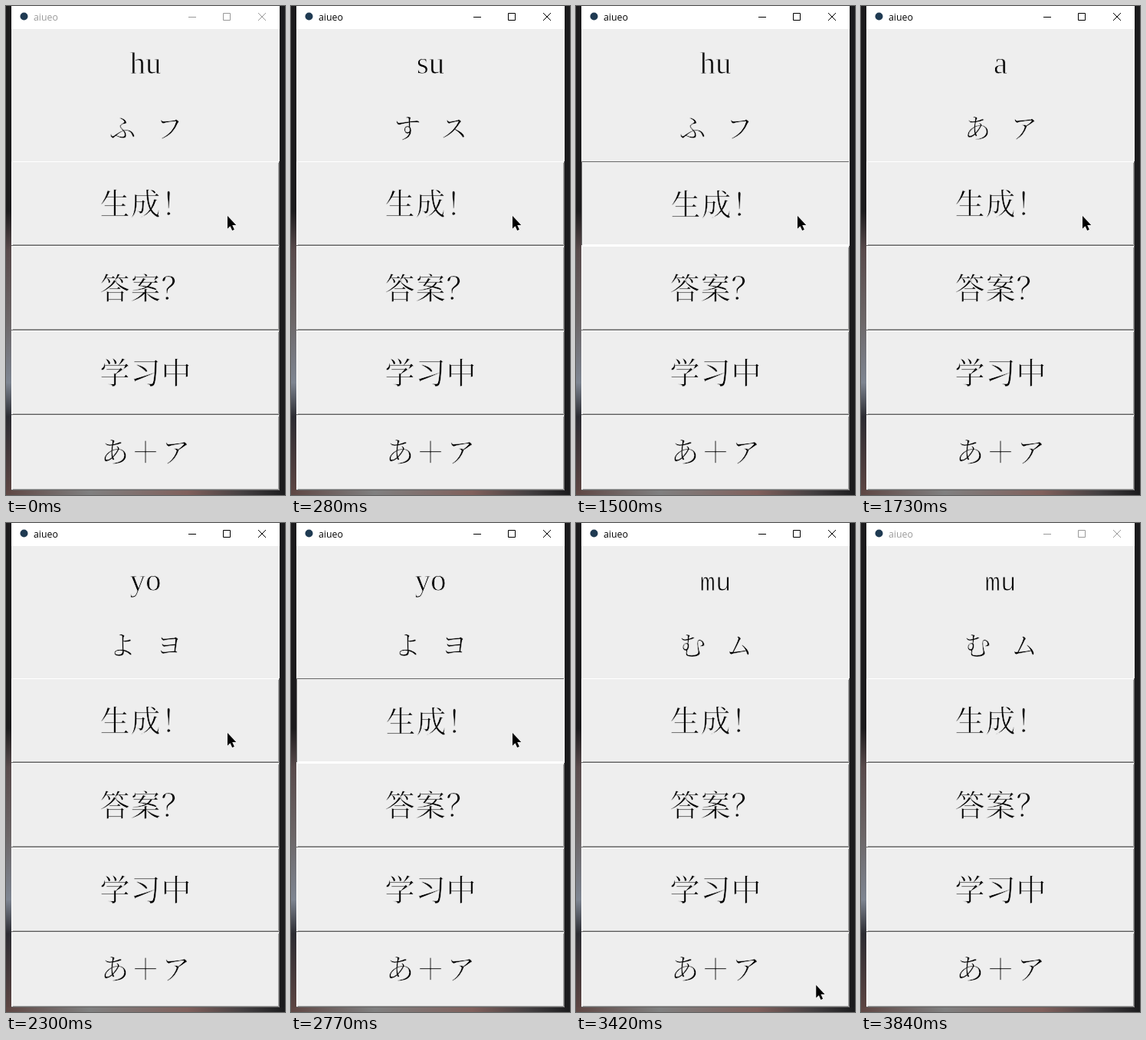
Recreate the animation shown at these times as an HTML page. Size 364 by 636 pixels, loop 3.88 s.

```html
<!DOCTYPE html>
<html lang="zh-CN">
<head>
<meta charset="utf-8">
<style>
html, body { margin: 0; height: 100%; overflow: hidden; background: #1b1b1d; }
svg { display: block; }
text { text-anchor: middle; }
.cjk { font: 300 39px "Noto Serif CJK SC", "Noto Sans CJK SC", "Noto Sans CJK", serif; }
.cjk, #romaji { stroke: #eee; stroke-width: .6px; }
.kana { font-size: 37px; }
#kana { font-size: 35px; }
.title { font: 12.3px "Open Sans", sans-serif; text-anchor: start; }
#romaji { font: 41px "Liberation Serif", serif; stroke-width: .9px; }
#romaji.mono { font: 34px "Liberation Mono", monospace; }
.light, .dark, .shade { fill: none; stroke: #fff; }
.dark { stroke: #696969; }
.shade { stroke: #a0a0a0; }
.pressed .light { stroke: #696969; }
.pressed .dark, .pressed .shade { stroke: #fff; }
.pressed text { transform: translate(1px, 1px); }
</style>
</head>
<body>
<svg id="stage" width="364" height="636" viewBox="0 0 364 636">
  <defs>
    <linearGradient id="left" x2="0" y2="1">
      <stop offset="0" stop-color="#1c1b1d"/>
      <stop offset=".42" stop-color="#1c1b1d"/>
      <stop offset=".5" stop-color="#594b4c"/>
      <stop offset=".64" stop-color="#6c6667"/>
      <stop offset=".77" stop-color="#7e8591"/>
      <stop offset=".84" stop-color="#2c2c32"/>
      <stop offset="1" stop-color="#5f4744"/>
    </linearGradient>
    <linearGradient id="bottom">
      <stop offset="0" stop-color="#5f4744"/>
      <stop offset=".3" stop-color="#808080"/>
      <stop offset=".65" stop-color="#80605c"/>
      <stop offset=".85" stop-color="#444042"/>
      <stop offset="1" stop-color="#1b1b1d"/>
    </linearGradient>
  </defs>
  <rect width="364" height="636" fill="#1b1b1d"/>
  <rect width="7" height="636" fill="url(#left)"/>
  <rect y="630" width="364" height="6" fill="url(#bottom)"/>
  <rect x="7" width="350" height="630" fill="#eee"/>
  <rect x="7" width="350" height="30" fill="#fff"/>
  <circle cx="23.5" cy="13.5" r="5" fill="#1f3a52"/>
  <g id="caption">
    <text class="title" x="36" y="19">aiueo</text>
    <path fill="none" stroke="currentColor" d="M238 14.5h10M283.5 9.5h9v9h-9zM329 9l10 10M339 9l-10 10"/>
  </g>
  <text id="romaji" x="182" y="88"></text>
  <text id="kana" class="cjk" x="152 213" y="172"></text>
  <g id="buttons"></g>
  <path id="cursor" d="M0 0V16.5L3.6 13.2L6.2 19L8.8 17.8L6.2 12H11.2Z"/>
</svg>
<script>
const LOOP = 3880, STEP = 46.85, HOLD = 135;
const $ = id => document.getElementById(id);
const buttons = [['生成！', 202, 312], ['答案？', 312, 422], ['学习中', 422, 532], ['あ＋ア', 532, 630]];
const clicks = [[50, 'su', 'すス'], [700, 'hu', 'ふフ'], [1500, 'a', 'あア'], [2110, 'yo', 'よヨ'], [2720, 'mu', 'むム']];
const path = [[0, 289, 273], [2900, 289, 273], [3000, 292, 300], [3140, 304, 440], [3235, 304, 529], [3515, 318, 638], [LOOP, 318, 660]];

$('buttons').innerHTML = buttons.map(([label, top, bottom], i) => `<g>
  <path class="shade" d="M9 ${bottom - 1.5}H355.5V${top + 2}"/>
  <path class="dark" d="M7 ${bottom - .5}H356.5V${top}"/>
  <path class="light" d="M7.5 ${bottom - 1}V${top + .5}H356"/>
  <text class="cjk ${i === 3 ? 'kana' : ''}" x="142 182 222" y="${(top + bottom) / 2 + (i === 3 ? 13 : 14)}">${label}</text>
</g>`).join('');
const generate = $('buttons').firstElementChild;

function cursorAt(t) {
  const i = path.findIndex(p => p[0] > t);
  const [t0, x0, y0] = path[i - 1], [t1, x1, y1] = path[i];
  const k = (t - t0) / (t1 - t0);
  return [x0 + (x1 - x0) * k, y0 + (y1 - y0) * k];
}

function draw() {
  const t = performance.now() % LOOP;
  const color = t >= 50 && t < 3840 ? '#000' : '#999';
  $('caption').style.color = $('caption').style.fill = color;

  let romaji = 'hu', kana = 'ふフ', pressed = false;
  for (const [start, nextRomaji, nextKana] of clicks) {
    if (t >= start + HOLD) [romaji, kana] = [nextRomaji, nextKana];
    else if (t >= start) pressed = true;
  }
  $('romaji').textContent = romaji;
  $('romaji').setAttribute('class', romaji === 'mu' ? 'mono' : '');
  $('kana').textContent = kana;
  generate.setAttribute('class', pressed ? 'pressed' : '');

  const sampled = Math.floor((t + 5) / STEP) * STEP;
  $('cursor').setAttribute('transform', `translate(${cursorAt(sampled)})`);
  requestAnimationFrame(draw);
}
draw();
</script>
</body>
</html>
```
